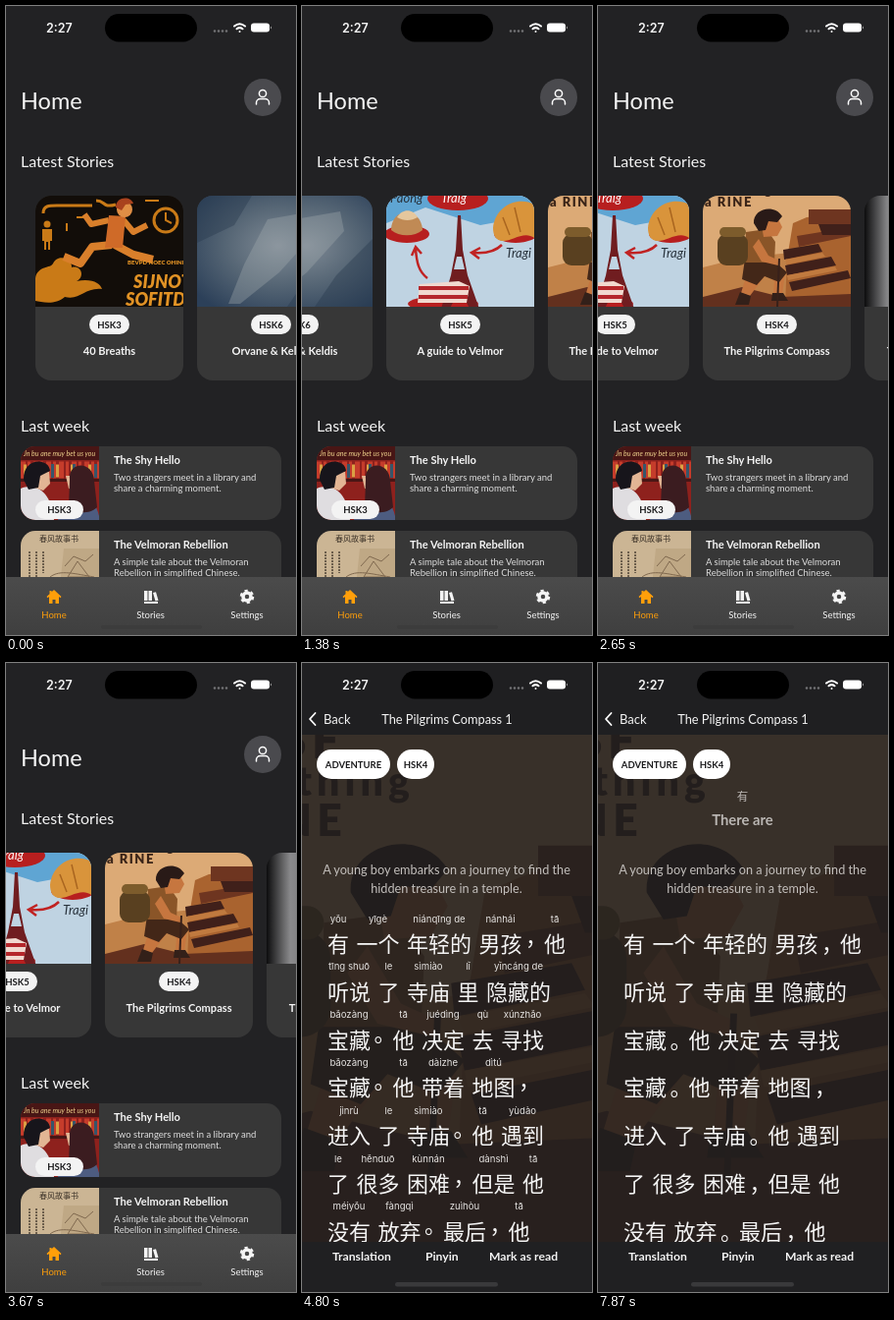
An HTML page that plays this animation: 296x640 px, repeating every 8000 ms.

```html
<!DOCTYPE html>
<html lang="en">
<head>
<meta charset="utf-8">
<title>Story reader</title>
<style>
html, body { margin: 0; width: 100%; height: 100%; overflow: hidden; background: #222224; }
svg { display: block; }
#stage { width: 100vw; height: 100vh; font-family: Lato, sans-serif; fill: #f4f4f4; }
.b { font-weight: 700; }
.mid { text-anchor: middle; }
.h2 { font-size: 16px; }
.name { font-size: 11.1px; font-weight: 700; }
.desc { font-size: 9.5px; fill: #dedede; }
.tag { font-size: 9.5px; font-weight: 700; fill: #1b1b1d; text-anchor: middle; }
.tab { font-size: 9.5px; text-anchor: middle; }
.act { font-size: 12.2px; font-weight: 700; }
.box { fill: #373737; }
.pill { fill: #f3f3f3; }
.han { font: 22px "Noto Sans CJK SC", "Noto Sans CJK", sans-serif; }
.py { font: 9.6px Inter, sans-serif; text-anchor: middle; fill: #e6e4e2; }
.line { fill: none; stroke: #fff; stroke-linecap: round; stroke-linejoin: round; }

/* Motion is held between steps, about nine per second. */
#strip, #page, #reader, #shade, #tapped, #pinyin, #toggle, #lookup, .dot {
  animation: 8s step-end infinite;
}
#strip { animation-name: swipe; }
#page { animation-name: recede; }
#reader { animation-name: push; }
#shade { animation-name: shade; }
#tapped { animation-name: tap; }
#pinyin { animation-name: hide; }
#toggle { animation-name: press; }
#lookup { animation-name: show; }
.dot { animation-name: drop; }

@keyframes swipe {
  0% { transform: translateX(0); }
  6.25% { transform: translateX(-14px); animation-timing-function: steps(4); }
  11.75% { transform: translateX(-141px); animation-timing-function: steps(4); }
  17.25% { transform: translateX(-274px); animation-timing-function: steps(2); }
  20.375% { transform: translateX(-330px); animation-timing-function: steps(2); }
  23.625% { transform: translateX(-358px); animation-timing-function: steps(2); }
  27.875% { transform: translateX(-372px); }
  30.125% { transform: translateX(-384px); animation-timing-function: steps(2); }
  33.125% { transform: translateX(-418px); animation-timing-function: steps(2); }
  35.875% { transform: translateX(-423px); }
  39.125%, 100% { transform: translateX(-424px); }
}
@keyframes recede {
  0% { transform: translateX(0); }
  53% { transform: translateX(-18px); }
  54.375% { transform: translateX(-57px); }
  55.875% { transform: translateX(-76px); }
  57.25% { transform: translateX(-84px); }
  58.625% { transform: translateX(-87px); }
  60%, 100% { transform: translateX(-89px); }
}
@keyframes push {
  0% { transform: translateX(300px); }
  53% { transform: translateX(237px); }
  54.375% { transform: translateX(107px); }
  55.875% { transform: translateX(41px); }
  57.25% { transform: translateX(15px); }
  58.625% { transform: translateX(4px); }
  60%, 100% { transform: translateX(0); }
}
@keyframes shade { 0% { opacity: 0; } 53% { opacity: .03; } 54.375%, 100% { opacity: .08; } }
@keyframes tap { 0% { opacity: 1; } 53%, 100% { opacity: .45; } }
@keyframes hide { 0% { opacity: 1; } 84.875%, 100% { opacity: 0; } }
@keyframes show { 0% { opacity: 0; } 98.375%, 100% { opacity: 1; } }
@keyframes drop { 0% { transform: translateY(-7px); } 84.875%, 100% { transform: translateY(0); } }
@keyframes press {
  0% { opacity: 1; }
  81.625% { opacity: .3; }
  84.875% { opacity: .5; }
  86.125% { opacity: .8; }
  87.5%, 100% { opacity: 1; }
}
</style>
</head>
<body>
<svg id="stage" viewBox="0 0 296 640" preserveAspectRatio="none">
  <defs>
    <clipPath id="card"><rect width="151" height="188" rx="16"/></clipPath>
    <clipPath id="row"><rect width="266" height="75" rx="15"/></clipPath>
    <radialGradient id="forest" cx=".55" cy=".45" r=".7">
      <stop stop-color="#7f8a95"/><stop offset=".5" stop-color="#566675"/><stop offset="1" stop-color="#2c4059"/>
    </radialGradient>
    <linearGradient id="mist">
      <stop stop-color="#0c0c0d"/><stop offset=".16" stop-color="#8a8a8c"/><stop offset="1" stop-color="#19191a"/>
    </linearGradient>
    <linearGradient id="bar" x2="0" y2="1">
      <stop stop-color="#4b4b4b"/><stop offset="1" stop-color="#3f3f3f"/>
    </linearGradient>

    <symbol id="hiker" viewBox="0 0 151 151">
      <path fill="#dcaa76" d="M0 0h151v151H0z"/>
      <g fill="#3a2418" font-weight="900" letter-spacing="1.500">
        <text x="13" y="7" font-size="15">RISE</text>
        <text x="10" y="18" font-size="12">old thing</text>
        <text x="2" y="30" font-size="13">a RINE</text>
      </g>
      <path fill="#c08148" d="M0 92l40-10 40-4 71-4v77H0z"/>
      <path fill="#a9632f" d="M92 47l14-6 45-5v95H84l2-48z"/>
      <path fill="#6e3520" d="M108 33h43v15h-43zM96 60l55-9v9l-53 11z"/>
      <path fill="#40201a" d="M118 48h33v11h-29zM82 74l36-6 4 8-39 8zM84 90l47-9 5 9-50 10zM88 107l60-12 3 8-60 13z"/>
      <path fill="#c07a3f" d="M84 84l38-7 3 4-39 8zM86 100l49-9 2 4-50 10z"/>
      <path fill="#63301e" d="M0 122l40-10 40 10 71-3v32H0z"/>
      <path fill="#c6763f" d="M46 95l17 6-15 20-9-3zM64 98l20-1-3 23-9-1 1-13z"/>
      <path fill="#332019" d="M38 117l11 4-2 9H33zM71 118h11l5 8H70z"/>
      <path fill="#432718" d="M43 83h27l16 14-8 10-15-6-8 9-15-6z"/>
      <path fill="#8a5528" d="M44 56l21-3 9 13-1 21H43z"/>
      <path fill="#c6763f" d="M57 63l10 17 11 5-1 5-17-4-9-15zM59 43h18l4 8-5 9-14 1z"/>
      <path fill="#291a17" d="M52 47c-1-15 21-20 29-7l-5 6-9-1-3 9-7 1z"/>
      <rect x="15" y="58" width="31" height="32" rx="9" fill="#594020"/>
      <rect x="17" y="51" width="27" height="10" rx="5" fill="#7d5c2c"/>
      <path stroke="#38211a" stroke-width="2" d="M78 83l-2 49"/>
    </symbol>
  </defs>

  <g id="page">
    <rect width="296" height="640" fill="#222224"/>
    <text x="15" y="105" font-size="23.500">Home</text>
    <circle cx="262" cy="93" r="19" fill="#4a4a4e"/>
    <g class="line" stroke-width="1.500">
      <circle cx="262" cy="89" r="3.600"/>
      <path d="M255.500 100v-1.500a4 4 0 0 1 4-4h5a4 4 0 0 1 4 4v1.500"/>
    </g>
    <text class="h2" x="15" y="164">Latest Stories</text>

    <g id="strip">
      <g transform="translate(30 193)" clip-path="url(#card)">
        <rect class="box" width="151" height="188"/>
        <svg width="151" height="113">
          <path fill="#120d09" d="M0 0h151v113H0z"/>
          <g fill="none" stroke="#c97a17" stroke-width="3">
            <path d="M8 18c0-8 6-8 14-8h36M62 5c10 0 6 8 20 4"/>
            <circle cx="133" cy="25" r="12"/>
            <path d="M133 17v8l6 3M32 28v8M42 22h10M112 5h14" stroke-width="2"/>
          </g>
          <g fill="#c97a17">
            <circle cx="12" cy="29" r="3.500"/><path d="M7 34h10v12h-2v9h-2v-8h-2v8H9v-9H7z"/>
            <path d="M0 84c2-13 16-10 18-15 6-11 20-4 19 4 10-3 14 10 5 14 16-3 24 2 26 8-18-2-22 12-38 8-10 9-24 5-30 4z"/>
          </g>
          <g fill="none" stroke="#d97f2b" stroke-width="8" stroke-linejoin="round">
            <path d="M78 50L58 52 46 69 29 62M81 50l19 10 20 5"/>
            <path d="M75 25L57 29l-7-10M90 25l10 12 14-7" stroke-width="6"/>
          </g>
          <path fill="#cf6a28" d="M75 20l17 1-3 32H71z"/>
          <circle cx="91" cy="14" r="8" fill="#e08e45"/>
          <path fill="#a9421e" d="M82 12c0-12 16-12 18-4l-8 1-4 6z"/>
          <g fill="#e19225" font-weight="900">
            <text x="94" y="70" font-size="6">BEVPD NOEC OHINE</text>
            <g font-style="italic" font-size="18"><text x="100" y="94">SIJNOT</text><text x="92" y="112">SOFITD.</text></g>
          </g>
        </svg>
        <rect class="pill" x="55" y="121" width="41" height="20" rx="10"/>
        <text class="tag" x="75.500" y="134.500">HSK3</text>
        <text class="name mid" x="75.500" y="162">40 Breaths</text>
      </g>

      <g transform="translate(195 193)" clip-path="url(#card)">
        <rect class="box" width="151" height="188"/>
        <svg width="151" height="113">
          <path fill="url(#forest)" d="M0 0h151v113H0z"/>
          <path fill="#a4abb0" opacity=".35" d="M72 24l46-8 4 20-38 42-40 32H32l16-40z"/>
          <path fill="#26374b" opacity=".4" d="M0 0h56L38 30 0 48zM151 44v69H92l22-32z"/>
        </svg>
        <rect class="pill" x="55" y="121" width="41" height="20" rx="10"/>
        <text class="tag" x="75.500" y="134.500">HSK6</text>
        <text class="name mid" x="75.500" y="162">Orvane &amp; Keldis</text>
      </g>

      <g transform="translate(360 193)" clip-path="url(#card)">
        <rect class="box" width="151" height="188"/>
        <svg width="151" height="113">
          <path fill="#bfd3e2" d="M0 0h151v113H0z"/>
          <path fill="#5fa5d3" d="M0 0h151v20L96 30 40 12 0 28z"/>
          <g fill="#b71f1f">
            <ellipse cx="73" cy="3" rx="31" ry="12"/><ellipse cx="21" cy="39" rx="23" ry="9"/>
            <ellipse cx="132" cy="39" rx="22" ry="9"/><ellipse cx="58" cy="110" rx="36" ry="8"/>
          </g>
          <path fill="#c08a55" d="M5 35c0-24 31-24 32 0-8 7-24 7-32 0z"/>
          <path fill="#e5c79d" d="M11 22c6-10 17-8 21 0-7 4-14 4-21 0z"/>
          <path fill="#d9943b" d="M109 33c2-23 26-33 42-24v34c-10-8-24 4-32 3-7 0-10-6-10-13z"/>
          <path stroke="#a9651f" stroke-width="1.500" d="M119 22l7 18M131 12l6 25"/>
          <path fill="#701d20" d="M73 20h3l2 35 5 26 12 34H85q-10-25-20 0h-9l10-34 5-26z"/>
          <path fill="#bfd3e2" d="M72 62h5l3 13H69z"/>
          <path fill="#f1d9cf" d="M34 90l40-3 11 5-3 17H32z"/>
          <path stroke="#b5272b" stroke-width="4" d="M33 94h51M33 103h50"/>
          <g fill="none" stroke="#c02323" stroke-width="2.500">
            <path d="M42 84c-9-7-11-16-12-30M26 61l4-9 6 7M118 50c-8 8-18 9-29 8M96 53l-9 5 8 6"/>
          </g>
          <g fill="#27313b" font-size="13" font-style="italic">
            <text x="4" y="7">Paong</text><text x="122" y="63">Tragi</text><text x="56" y="7" fill="#fff">Traig</text>
          </g>
        </svg>
        <rect class="pill" x="55" y="121" width="41" height="20" rx="10"/>
        <text class="tag" x="75.500" y="134.500">HSK5</text>
        <text class="name mid" x="75.500" y="162">A guide to Velmor</text>
      </g>

      <g id="tapped"><g transform="translate(525 193)" clip-path="url(#card)">
        <rect class="box" width="151" height="188"/>
        <svg width="151" height="113"><use href="#hiker" y="-19" width="151" height="151"/></svg>
        <rect class="pill" x="55" y="121" width="41" height="20" rx="10"/>
        <text class="tag" x="75.500" y="134.500">HSK4</text>
        <text class="name mid" x="75.500" y="162">The Pilgrims Compass</text>
      </g></g>

      <g transform="translate(690 193)" clip-path="url(#card)">
        <rect class="box" width="151" height="188"/>
        <rect width="151" height="113" fill="url(#mist)"/>
        <text class="name mid" x="75.500" y="162">The Hidden Orchards</text>
      </g>
    </g>

    <text class="h2" x="15" y="433">Last week</text>
    <g transform="translate(15 448)" clip-path="url(#row)">
      <rect class="box" width="266" height="75"/>
      <svg width="80" height="75">
        <path fill="#8e211d" d="M0 0h80v75H0z"/>
        <path fill="#481615" d="M0 0h80v14H0zM0 33h80v3H0z"/>
        <path stroke="#c53c2b" stroke-width="17" stroke-dasharray="5 2 3 3" d="M0 24h80"/>
        <path stroke="#dba044" stroke-width="13" stroke-dasharray="3 12 2 16" d="M3 25h77"/>
        <path stroke="#36566a" stroke-width="14" stroke-dasharray="3 19" d="M9 25h71"/>
        <text x="3" y="10" font-size="7" font-style="italic" fill="#edd18b">Jn bu ane muy bet us you</text>
        <path fill="#dfdde0" d="M0 43c14-6 31 1 34 32H0z"/>
        <path fill="#4d5c80" d="M38 75c1-22 37-32 42-4v4z"/>
        <path fill="#e2b594" d="M14 26h15l1 12-7 7-9-3zM46 30h9l1 14-7-1z"/>
        <path fill="#17151b" d="M3 34c-1-23 26-23 27-9l-10 5-2 12-10 2z"/>
        <path fill="#3b1c20" d="M50 34c-2-19 24-20 25 1l3 27c-8 8-24 6-29 1z"/>
      </svg>
      <rect class="pill" x="15" y="55" width="49" height="19" rx="9.500"/>
      <text class="tag" x="39.500" y="68">HSK3</text>
      <text class="name" x="95" y="18">The Shy Hello</text>
      <text class="desc" x="95" y="35">Two strangers meet in a library and</text>
      <text class="desc" x="95" y="46">share a charming moment.</text>
    </g>
    <g transform="translate(15 534)" clip-path="url(#row)">
      <rect class="box" width="266" height="75"/>
      <svg width="80" height="75">
        <path fill="#cbb594" d="M0 0h80v75H0z"/>
        <path fill="#bfa885" d="M44 18h36v57H38z"/>
        <text x="19" y="11" font-size="8" fill="#3c3228" font-family="'Noto Sans CJK SC', sans-serif">春风故事书</text>
        <path stroke="#6d5f4d" stroke-width="2" stroke-dasharray="2 1" d="M9 21v26M16 21v30M23 21v22"/>
        <path fill="none" stroke="#80694f" d="M45 36l9-10 12 5 8-7M48 47l10-16 12 16zM30 47c10-8 26-3 45 0"/>
      </svg>
      <text class="name" x="95" y="18">The Velmoran Rebellion</text>
      <text class="desc" x="95" y="35">A simple tale about the Velmoran</text>
      <text class="desc" x="95" y="46">Rebellion in simplified Chinese.</text>
    </g>

    <rect y="581" width="296" height="59" fill="url(#bar)"/>
    <rect x="97" y="630" width="103" height="4" rx="2" fill="#3c3c3c"/>
    <path fill="#ff9f0a" d="M49 594l7.500 7-1 1.200-1.500-1.200v7h-3.500v-4h-3v4H44v-7l-1.500 1.200-1-1.200 3-2.800V595h2v1.300z"/>
    <path d="M141 595h3.500v10H141zM145.500 595h3.500v10h-3.500zM150 597l3-.8 2.500 8.500-3 .8zM141 606h14v2h-14z"/>
    <circle cx="246" cy="601" r="4" fill="none" stroke="#f4f4f4" stroke-width="3.500"/>
    <circle cx="246" cy="601" r="6" fill="none" stroke="#f4f4f4" stroke-width="2.500" stroke-dasharray="3.140"/>
    <text class="tab" x="49" y="622.500" fill="#ff9f0a">Home</text>
    <text class="tab" x="147.500" y="622.500">Stories</text>
    <text class="tab" x="246" y="622.500">Settings</text>
  </g>
  <rect id="shade" width="296" height="640" fill="#000"/>

  <g id="reader">
    <rect width="296" height="640" fill="#201e1e"/>
    <svg y="73" width="296" height="516"><use href="#hiker" x="-128" width="516" height="516" opacity=".13"/></svg>
    <rect width="296" height="73" fill="#1f1f21"/>
    <path class="line" stroke-width="1.800" d="M13.500 51L8 57l5.500 6"/>
    <text x="22" y="61.500" font-size="13">Back</text>
    <text class="mid" x="148" y="61.500" font-size="12.800">The Pilgrims Compass 1</text>
    <rect x="15" y="88" width="75" height="30" rx="15" fill="#fff"/>
    <rect x="97" y="88" width="38" height="30" rx="15" fill="#fff"/>
    <text class="tag" x="52.500" y="106.500">ADVENTURE</text>
    <text class="tag" x="116" y="106.500">HSK4</text>
    <g id="lookup" class="mid" fill="#bab6b3">
      <text x="147.500" y="140" font-size="11.500" font-family="'Noto Sans CJK SC', sans-serif" lang="zh-CN">有</text>
      <text class="b" x="147.500" y="165" font-size="14.800">There are</text>
    </g>
    <g class="mid" font-size="12.700" fill="#c4c0bd">
      <text x="147.500" y="215">A young boy embarks on a journey to find the</text>
      <text x="147.500" y="234">hidden treasure in a temple.</text>
    </g>
    <g id="han" class="han" lang="zh-CN"></g>
    <g id="pinyin"></g>
    <rect y="589" width="296" height="51" fill="#202022"/>
    <text class="act" x="31" y="608">Translation</text>
    <text id="toggle" class="act" x="126" y="608">Pinyin</text>
    <text class="act" x="191" y="608">Mark as read</text>
    <rect x="95" y="630" width="105" height="4.500" rx="2.200" fill="#39393b"/>
  </g>

  <rect x="101" y="8" width="94" height="28.500" rx="14.200" fill="#000"/>
  <text x="41" y="26.500" font-size="12.500" font-weight="600" font-family="Inter, sans-serif">2:27</text>
  <path stroke="#737375" stroke-width="2.600" stroke-linecap="round" stroke-dasharray="0 4" d="M213 25.500h13"/>
  <g class="line" stroke-width="2">
    <path d="M233 20.500q5.500-4.500 11 0M235.500 23.300q3-2.300 6 0"/><path d="M238.500 26v.1"/>
  </g>
  <rect x="250" y="17.500" width="19" height="9" rx="3" fill="#fff"/>
  <path d="M270 20.500v3q2-1.500 0-3z" fill="#aaa"/>
</svg>

<script>
const lines = [
  '有 yǒu|一个 yīgè|年轻的 niánqīng de|男孩 nánhái|，|他 tā',
  '听说 tīng shuō|了 le|寺庙 sìmiào|里 lǐ|隐藏的 yǐncáng de',
  '宝藏 bǎozàng|。|他 tā|决定 juédìng|去 qù|寻找 xúnzhǎo',
  '宝藏 bǎozàng|。|他 tā|带着 dàizhe|地图 dìtú|，',
  '进入 jìnrù|了 le|寺庙 sìmiào|。|他 tā|遇到 yùdào',
  '了 le|很多 hěnduō|困难 kùnnán|，|但是 dànshì|他 tā',
  '没有 méiyǒu|放弃 fàngqì|。|最后 zuìhòu|，|他 tā'
];
const em = 22, gap = 7.5, pitch = 48.8;

function put(parent, cls, x, y, text) {
  const el = document.createElementNS('http://www.w3.org/2000/svg', 'text');
  el.setAttribute('class', cls);
  el.setAttribute('x', x);
  el.setAttribute('y', y);
  el.textContent = text;
  document.getElementById(parent).append(el);
}

lines.forEach((line, i) => {
  let x = 26;
  for (const word of line.split('|')) {
    const [han, ...sound] = word.split(' ');
    const width = sound.length ? han.length * em : gap;
    put('han', sound.length ? 'word' : 'dot', sound.length ? x : x - 4, 294 + i * pitch, han);
    if (sound.length) put('pinyin', 'py', x + width / 2, 263.5 + i * pitch, sound.join(' '));
    x += width + gap;
  }
});
</script>
</body>
</html>
```
